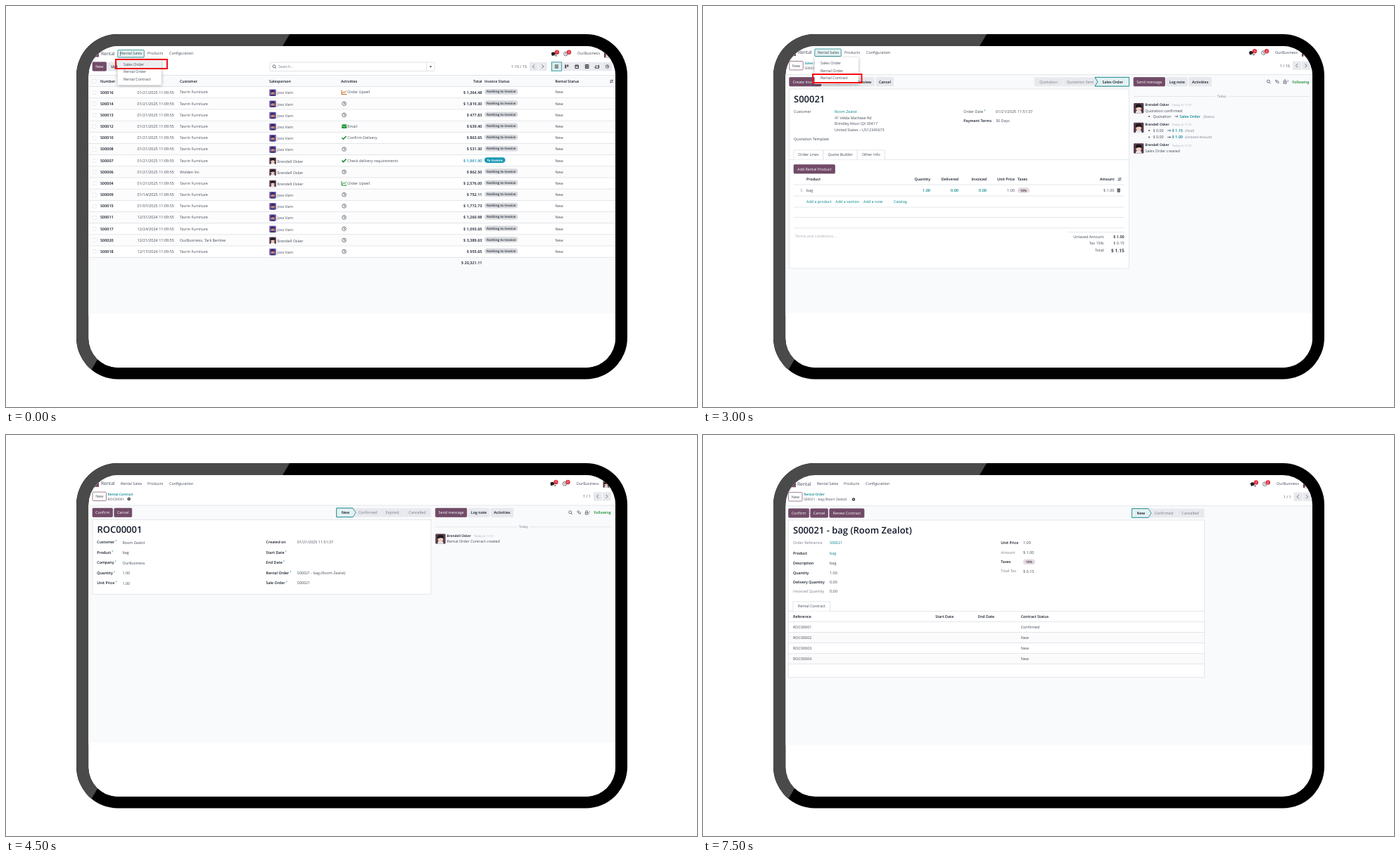
Write an HTML page that moves like this. It is 982 px wide and 570 px high and loops after 8 s.

```html
<!DOCTYPE html>
<html lang="en">
<head>
<meta charset="utf-8">
<title>Rental workflow</title>
<style>
html, body { margin: 0; width: 100%; height: 100%; overflow: hidden; background: #fff; }
svg { display: block; width: 982px; height: 570px; }
text { font: 5.4px "Open Sans", "Noto Sans", sans-serif; fill: #414956; text-rendering: geometricPrecision; white-space: pre; }
.b { font-weight: 600; font-size: 5.3px; fill: #111827; }
.n { font-size: 5.5px; }
.l { font-size: 6.6px; }
.h { font-size: 13px; }
.s { font-size: 4.8px; }
.xs { font-size: 4.2px; }
.pill { font-size: 4.5px; font-weight: 700; }
.w { fill: #fff; }
.teal, .q { fill: #01848a; }
.q { font-size: 4px; font-weight: 600; }
.mute { fill: #777e89; }
.pale { fill: #a9afb8; }
.green { fill: #118a2c; }
.blue { fill: #1687b0; }
.e { text-anchor: end; }
.m { text-anchor: middle; }
.i { font-style: italic; }
.line { fill: none; stroke: #4b5360; stroke-width: .8; }
.shadow { filter: drop-shadow(0 1px 2px #0005); }
.scene { visibility: hidden; animation: show 8s step-end infinite; }
.scene.base { visibility: visible; animation: none; }
@keyframes show { 0% { visibility: visible; } 18.75%, 100% { visibility: hidden; } }
</style>
</head>
<body>
<svg viewBox="0 0 982 570">
  <defs>
    <clipPath id="shell"><rect x="100" y="40" width="783" height="490.500" rx="59"/></clipPath>
    <clipPath id="screen"><rect x="117.500" y="57" width="748.500" height="457" rx="42"/></clipPath>
  </defs>
  <g clip-path="url(#shell)">
    <rect x="100" y="40" width="783" height="491"/>
    <path d="M90 30H409L112 533H90Z" fill="#4a4a4a"/>
  </g>
  <g id="stage" clip-path="url(#screen)"></g>
</svg>
<script>
const PURPLE = '#714b67', GREY = '#e7e9ed', TEAL = '#16878c', EDGE = '#d9dce1', BG = '#f9fafc';
const COMPANY = 'OurBusiness', ADMIN = 'Brendell Osker', SELLER = 'Joss Varn', CLIENT = 'Room Zealot';

const text = (x, y, s, c = '') => `<text x="${x}" y="${y}" dy=".35em" class="${c}">${s}</text>`;
const rect = (x, y, w, h, fill, more = '') => `<rect x="${x}" y="${y}" width="${w}" height="${h}" fill="${fill}" ${more}/>`;
const path = (x, y, d, more = 'class="line"') => `<path transform="translate(${x} ${y})" d="${d}" ${more}/>`;
const fill = c => `fill="${c}"`;
const rule = (x1, x2, y, c = EDGE) => rect(x1, y - .35, x2 - x1, .7, c);
const help = s => `${s}<tspan class="q" dx="1.200" dy="-2">?</tspan>`;
const list = (items, f) => items.map(f).join('');

const button = (x1, x2, y, s, kind = 'main') => {
  const [bg, border, c] = {
    main: [PURPLE, PURPLE, 'm w'], grey: [GREY, GREY, 'm b'], line: ['#fff', PURPLE, 'm']
  }[kind];
  return rect(x1, y - 6.2, x2 - x1, 12.4, bg, `rx="1.200" stroke="${border}" stroke-width=".7"`) +
    text((x1 + x2) / 2, y, s, c);
};
const redBox = (x, y, w, h) => rect(x, y, w, h, 'none', 'stroke="#f01014" stroke-width="2"');
const pill = (x, y, w, s, bg = '#d8dadd', c = '') =>
  rect(x, y - 3.8, w, 7.6, bg, 'rx="3.800"') + text(x + w / 2, y, s, 'pill m ' + c);

const avatar = (x, y, size, admin) => `<g transform="translate(${x} ${y}) scale(${size / 10})">` +
  rect(0, 0, 10, 10, admin ? '#593a4c' : '#6a54a8', 'rx="1"') +
  path(0, 0, 'M2 10Q2 7 5 7T8 10Z', fill(admin ? '#e9e4e4' : '#3c3566')) +
  `<circle cx="5" cy="5" r="2.700" fill="${admin ? '#edcdbd' : '#c98a68'}"/>` +
  path(0, 0, 'M2 5Q1 1 5 1T8 5Q6 3 2 5Z', fill(admin ? '#1d171c' : '#33265e')) + '</g>';

const clock = (x, y, r = 2.8) => `<circle cx="${x}" cy="${y}" r="${r}" class="line"/>` + path(x, y, 'M0-1.700V.3H1.500');
const search = (x, y) => path(x, y, 'M1 1L2.700 2.700M1.500-.5A2 2 0 1 1-2.500-.5A2 2 0 1 1 1.500-.5');
const caret = (x, y) => path(x, y, 'M-1.800-.8H1.800L0 1.200Z', fill('#333'));
const gear = (x, y) => `<circle cx="${x}" cy="${y}" r="1.500" fill="none" stroke="#333" stroke-width="1.400"/>`;
const sliders = (x, y) => path(x, y, 'M-2.500-1.200H2.500M-2.500 1.200H2.500M1-2.500V0M-1 0V2.500');
const badge = (x, y, n) => `<circle cx="${x}" cy="${y}" r="3.200" fill="#dc3545"/>` + text(x, y, n, 'xs m w');

const nav = (y, end, dx = 0) =>
  rect(124, y - 3, 8, 8, PURPLE) + text(135 + dx, y, 'Rental', 'l') +
  list([[163, 'Rental Sales'], [201, 'Products'], [232, 'Configuration']], ([x, s]) => text(x + dx, y, s)) +
  path(end - 66, y + .5, 'M-3 0A3 2.300 0 1 1 1 2L-2 3ZM0 2.500A2.500 2 0 0 0 4 1.500L5 3.500Z', fill('#222')) +
  badge(end - 61, y - 1.8, 7) + clock(end - 48.5, y + .5) + badge(end - 44, y - 1.8, 2) +
  text(end, y, COMPANY, 'e') + avatar(end + 6, y - 3, 9, true);

const menu = (y, hover) =>
  rect(158.8, y - 5, 37.5, 10.5, '#e3f1f2', `rx="1" stroke="${TEAL}" stroke-width=".8"`) + text(163, y, 'Rental Sales') +
  rect(158.5, y + 7, 62.5, 37.8, '#fff', 'class="shadow"') +
  (hover ? rect(158.5, y + 10, 62.5, 10.7, '#eceef0') : '') +
  list(['Sales Order', 'Rental Order', 'Rental Contract'], (s, i) => text(167, y + 15.6 + i * 10.5, s));

const pager = (end, y, s) => text(end, y, s, 'e') +
  rect(end + 4, y - 6.2, 12, 12.4, GREY) + rect(end + 16.8, y - 6.2, 12, 12.4, GREY) +
  path(end + 10, y, 'M1-2.500L-1.500 0L1 2.500') + path(end + 22.5, y, 'M-1-2.500L1.500 0L-1 2.500');

const crumbs = (x, y, parent, s, gearX) => button(x, x + 19.5, y, 'New', 'line') +
  text(x + 21.7, y - 3.2, parent, 'b s teal') + text(x + 21.7, y + 3.6, s, 's') + gear(gearX, y + 3.6);

const status = (y, edges, labels, active) => {
  const step = (s, i) => {
    const a = edges[i], b = edges[i + 1], last = i == labels.length - 1, on = i == active;
    const right = last ? `H${b}V${y + 6.3}` : `H${b - 4}L${b} ${y}L${b - 4} ${y + 6.3}`;
    const left = i ? `H${a - 4}L${a} ${y}Z` : `H${a}Z`;
    return `<path d="M${i ? a - 4 : a} ${y - 6.3}${right}${left}" fill="${on ? '#e3f1f2' : GREY}" stroke="${on ? TEAL : '#f1f2f5'}" stroke-width=".8"/>` +
      text((a + b) / 2 - 1, y, s, on ? 'b m' : 'm mute');
  };
  return list(labels, step) + step(labels[active], active);
};

const message = (x, y, body = '') => avatar(x, y - 2.5, 14.3, true) + text(x + 16.3, y, ADMIN, 'b s') +
  text(x + 54.5, y + .3, 'Today at 11:51', 'xs pale') + text(x + 16.3, y + 8.4, body);
const chatter = (x, y, todayY, followers = 1) =>
  button(x, x + 44.5, y, 'Send message') + button(x + 46.8, x + 76.5, y, 'Log note', 'grey') +
  button(x + 78.8, x + 110.5, y, 'Activities', 'grey') + search(x + 192, y) +
  path(x + 204, y, 'M-2-1L1 2Q3 2 2 0L-1-2.500Q-3-2.500-2-.5L0 1') +
  path(x + 215, y, 'M-2 2.500V0H2V2.500ZM-1.300 0V-1.500A1.300 1.300 0 0 1 1.300-1.500V0') +
  text(x + 218, y - 1, followers, 'xs') + text(x + 249.5, y, 'Following', 'b e green') +
  rule(x, x + 250, todayY) + rect(x + 116, todayY - 3, 18, 6, BG) + text(x + 125, todayY, 'Today', 's m mute');

const sheet = (x1, y1, x2, y2) => rect(x1, y1, x2 - x1, y2 - y1, '#fff', `stroke="${EDGE}" stroke-width=".7"`);
const page = (top, bottom) => rect(117, 57, 750, 458, '#fff') + rect(117, top, 750, bottom - top, BG) + rule(117, 867, top);
const tab = (x1, x2, y, s) => path(0, 0, `M${x1} ${y}V${y - 13.5}H${x2}V${y}`, `fill="#fff" stroke="${EDGE}" stroke-width=".7"`) +
  text((x1 + x2) / 2, y - 6.8, s, 'm');

const ROWS = [
  '16|01/21/2025|F|S|up|1,364.48', '14|01/21/2025|F|S||1,819.30', '13|01/21/2025|F|S||477.83',
  '12|01/21/2025|F|S|mail|639.40', '10|01/21/2025|F|S|confirm|863.65', '08|01/21/2025|F|S||531.30',
  '07|01/21/2025|F|A|check|1,961.90', '06|01/21/2025|W|A||862.50', '04|01/21/2025|F|A|grow|2,576.00',
  '09|01/14/2025|F|S||752.11', '15|01/07/2025|F|S||1,772.73', '11|12/31/2024|F|S||1,260.98',
  '17|12/24/2024|F|S||1,093.65', '20|12/21/2024|J|A||3,389.63', '18|12/17/2024|F|S||955.65'];
const CUSTOMERS = { F: 'Tavrin Furniture', W: 'Wolden Inc', J: COMPANY + ', Tark Benlow' };

const chart = (x, y, c) => path(x, y, 'M-3.500-3V3H4M-2.500 1.500L-.5-.8L.8.4L3.300-2', `fill="none" stroke="${c}"`);
const tick = (x, y) => path(x, y, 'M-3 0L-1 2L3-2.200', 'fill="none" stroke="#118a2c" stroke-width="1.500"');
const ACTIVITIES = {
  '': [clock, ''],
  up: [(x, y) => chart(x, y, '#b8611f'), 'Order Upsell'],
  grow: [(x, y) => chart(x, y, '#118a2c'), 'Order Upsell'],
  mail: [(x, y) => rect(x - 3.3, y - 2.7, 7, 5.4, '#118a2c') + path(x, y, 'M-3.300-1.500L.2 1L3.700-1.500', 'fill="none" stroke="#fff" stroke-width=".7"'), 'Email'],
  confirm: [tick, 'Confirm Delivery'],
  check: [tick, 'Check delivery requirements']
};

const orderRow = (row, i) => {
  const [id, day, customer, who, act, total] = row.split('|'), y = 122.6 + i * 16.17, due = act == 'check';
  const [icon, label] = ACTIVITIES[act];
  return rect(117, y - 8, 750, 16.17, i % 2 ? '#fcfcfd' : '#fff') + rule(117, 867, y - 8) +
    rect(123, y - 2.2, 5, 5, '#fff', `stroke="${EDGE}" stroke-width=".5"`) +
    text(134, y, 'S000' + id, 'b n') + text(186.5, y, day + ' 11:09:55', 'n') + text(247, y, CUSTOMERS[customer]) +
    avatar(374.3, y - 4.2, 9.5, who == 'A') + text(385.3, y + 1, who == 'A' ? ADMIN : SELLER) +
    icon(480.5, y) + text(485.3, y, label) + text(676.5, y, '$ ' + total, 'b n e ' + (due ? 'blue' : '')) +
    (due ? pill(680, y - .5, 29.5, 'To Invoice', '#1797b5', 'w') : pill(680, y - .7, 47.5, 'Nothing to Invoice')) +
    text(780.5, y, 'New');
};

const views = ['M-2.500-2H2.500M-2.500 0H2.500M-2.500 2H2.500', 'M-1.500-2.500V2.500M1.500-2.500V.5', 'M-2.200-2H2.200V2.500H-2.200ZM-2-.7H2',
  'M-2.200-2.500H2.200V2.500H-2.200ZM0-2.500V2.500M-2 0H2', 'M-2.700 2.200V0L-1-1.500L.5 0L2.500-2V2.200Z'];

const orders = () => page(98.5, 437) + nav(67.5, 844) +
  button(123, 142.7, 86, 'New') + button(144.8, 172, 86, 'Upload', 'grey') +
  rect(375, 80, 234, 12.5, '#fff', `stroke="${EDGE}" stroke-width=".8" rx="1"`) + rect(597.3, 80, .7, 12.5, EDGE) +
  search(381.5, 86.3) + text(387, 86.2, 'Search...', 'mute') + caret(603.5, 86.3) + pager(740, 86, '1-15 / 15') +
  list([0, 1, 2, 3, 4, 5], i => rect(775.5 + i * 14.4, 79.8, 13.9, 12.4, i ? GREY : '#d8ebed', i ? '' : `stroke="${TEAL}" stroke-width=".8"`)) +
  list(views, (d, i) => path(782.4 + i * 14.4, 86, d, `fill="none" stroke="#333" stroke-width="${i == 1 ? 1.8 : 1}"`)) + clock(854.5, 86, 2.3) +
  rect(123, 104.3, 5, 5, '#fff', `stroke="${EDGE}" stroke-width=".5"`) +
  list([[134, 'Number'], [186.5, 'Order Date'], [247, 'Customer'], [374, 'Salesperson'], [476, 'Activities'], [680, 'Invoice Status'], [780.5, 'Rental Status']],
    ([x, s]) => text(x, 106.8, s, 'b')) + text(676.5, 106.8, 'Total', 'b e') + sliders(860.5, 107) +
  list(ROWS, orderRow) + rule(117, 867, 357.2) + text(676.5, 365, '$ 20,321.11', 'b n e') +
  menu(67.5, true) + rect(162.5, 64.5, .5, 6.5, '#333') + redBox(156, 76, 73, 13);

const address = (y, c) => text(187, y, CLIENT, c) +
  list(['41 Velda Marlowe Rd', 'Brindley Moor QX 00417', 'United States – US12345673'], (s, i) => text(187, y + 9 + i * 8.5, s));
const links = y => list([[147, 'Add a product'], [188.3, 'Add a section'], [228, 'Add a note'], [271, 'Catalog']], ([x, s]) => text(x, y, s, 'teal'));
const lines = ys => list(ys, y => rule(129, 599, y));

const quotation = () => page(98, 515) + nav(66.7, 845) + crumbs(123, 85.7, 'Sales Orders', 'S00021', 167) + pager(833, 85.5, '1 / 1') +
  button(123, 166.5, 108.3, 'Send by Email') + button(169, 196.5, 108.3, 'Confirm', 'grey') +
  button(199, 227.5, 108.3, 'Preview', 'grey') + button(230.5, 254.5, 108.3, 'Cancel', 'grey') +
  status(108.3, [471.5, 514, 562, 605.5], ['Quotation', 'Quotation Sent', 'Sales Order'], 0) + chatter(612, 108.3, 128.8) +
  message(612, 141, 'Sales Order created') + sheet(123, 119, 605.5, 355.5) + text(129.3, 133, 'S00021', 'b h') +
  text(129.5, 150.3, 'Customer', 'b') + address(150.5) + text(370.3, 150.5, help('Expiration'), 'b') + text(416, 150.5, '02/20/2025', 'n') +
  text(370.3, 165, 'Payment Terms', 'b') + text(416, 165, '30 Days') + text(129.5, 189.3, 'Quotation Template', 'b') +
  rule(123, 605.5, 217.8) + tab(129.5, 171.5, 217.8, 'Order Lines') + tab(171.5, 230, 217.8, 'Optional Products') +
  tab(230, 278, 217.8, 'Quote Builder') + tab(278, 318, 217.8, 'Other Info') +
  button(129.3, 188, 231.5, 'Add Rental Product') + text(147, 245.8, 'Product', 'b') + links(262) + lines([253.8, 270, 285, 299.5, 314.5]) +
  text(131, 326, 'Terms and conditions...', 'pale') + rule(553, 599, 320.3) + text(570.5, 328, 'Total:', 'e') + text(598.5, 328, '$ 0.00', 'b l e') +
  rect(117, 57, 750, 458, '#000', 'opacity=".5"') + redBox(126.8, 220, 70, 20) +
  rect(301, 197, 383, 100, '#fff', 'class="shadow" rx="1"') + text(307.3, 208.4, 'Rental Product', 'b" style="font-size:6.6px') +
  path(675, 208.3, 'M-2.500-2.500L2.500 2.500M2.500-2.500L-2.500 2.500') + rule(301, 684, 219.5) + rule(301, 684, 272) +
  text(307.3, 230.6, help('Product'), 'b') + text(307.3, 245, help('Unit Price')) + text(307.3, 258.7, help('Quantity'), 'b') +
  rule(343, 486.5, 235, TEAL) + rect(343.3, 227, .6, 7, '#222') + path(484.5, 231, 'M-1.500-.7H1.500L0 1Z', fill(TEAL)) +
  text(343.5, 245, '0.00', 'n') + text(343.5, 258.7, '1.00', 'n') + button(307.3, 332.3, 284.3, 'Cancel') + button(334.8, 374.5, 284.3, 'Add Product');

const change = (y, from, to, note) => `<circle cx="634" cy="${y}" r=".9" fill="#333"/>` + text(639.5, y, from) +
  (from == 'Quotation'
    ? path(670.5, y, 'M0 0H4.500M3-1.300L4.500 0L3 1.300') + text(677.3, y, to, 'b teal') + text(711, y, note, 's i mute')
    : path(660, y, 'M0 0H4.500M3-1.300L4.500 0L3 1.300') + text(666.5, y, to, 'b n teal') + text(685, y, note, 's i mute'));

const saleOrder = () => page(97.7, 436) + nav(66, 845) + crumbs(122.7, 84.7, 'Sales Orders', 'S00021', 167) + pager(834, 84.7, '1 / 16') +
  button(122.7, 168, 107.7, 'Create Invoice') + button(170, 213, 107.7, 'Send by Email', 'grey') +
  button(215, 243.5, 107.7, 'Preview', 'grey') + button(246, 270.8, 107.7, 'Cancel', 'grey') +
  status(107.7, [471, 513, 561, 605.5], ['Quotation', 'Quotation Sent', 'Sales Order'], 2) + chatter(612, 107.7, 128.3, 2) +
  message(612, 140.6, 'Quotation confirmed') + change(157, 'Quotation', 'Sales Order', '(Status)') +
  message(612, 168.3) + change(177, '$ 0.00', '$ 1.15', '(Total)') + change(186.5, '$ 0.00', '$ 1.00', '(Untaxed Amount)') +
  message(612, 197.8, 'Sales Order created') + sheet(122.7, 118, 605.5, 373) + text(129, 132.3, 'S00021', 'b h') +
  text(129, 150, 'Customer') + address(150, 'teal') + text(370.3, 150, help('Order Date')) + text(416, 150, '01/21/2025 11:51:37', 'n') +
  text(370.3, 163.2, 'Payment Terms', 'b') + text(416, 163.2, '30 Days') + text(129, 189, 'Quotation Template') +
  rule(122.7, 605.5, 218.3) + tab(129, 171, 218.3, 'Order Lines') + tab(171, 219.3, 218.3, 'Quote Builder') + tab(219.3, 258.5, 218.3, 'Other Info') +
  button(129, 187.5, 231.8, 'Add Rental Product') + text(147, 246, 'Product', 'b') + text(447, 246, 'Taxes', 'b') +
  list([[323, 'Quantity', '1.00'], [363, 'Delivered', '0.00'], [403, 'Invoiced', '0.00'], [443, 'Unit Price', '1.00'], [584.5, 'Amount', '$ 1.00']],
    ([x, s, v], i) => text(x, 246, s, 'b e') + text(x, 262, v, i < 3 ? 'b n e teal' : 'n e')) + sliders(592, 246.2) +
  path(140, 262, 'M-.8-2V2M.8-2V2', 'stroke="#aaa" stroke-dasharray=".8"') + text(147, 262, 'bag') + pill(447, 262, 17, '15%', '#e6d8df') +
  path(590.7, 262, 'M-1.800-1.500H1.800L1.500 2.500H-1.500ZM-2.300-2.200H2.300', `fill="#777" stroke="#444" stroke-width=".7"`) +
  lines([254, 270, 286, 300.5, 315.3]) + links(278) + text(131, 327, 'Terms and conditions...', 'pale') + rule(520, 599, 321.3) +
  list([['Untaxed Amount:', '$ 1.00', 328, 'b n e'], ['Tax 15%:', '$ 0.15', 337.3, 'n e'], ['Total:', '$ 1.15', 347.2, 'b l e']],
    ([s, v, y, c]) => text(570.5, y, s, 'e') + text(598.7, y, v, c)) +
  menu(66) + redBox(156, 97, 69.5, 12);

const contract = dy => {
  const dx = dy ? .6 : 0, left = [['Customer', CLIENT], ['Product', 'bag'], ['Company', COMPANY], ['Quantity', '1.00'], ['Unit Price', '1.00']];
  const right = [['Created on', '01/21/2025 11:51:37'], ['Start Date', ''], ['End Date', ''], ['Rental Order', `S00021 - bag (${CLIENT})`], ['Sale Order', 'S00021']];
  return sheet(123 - dx / 2, 120.6 + dy, 604 + dx * 2, 226.2 + dy) + text(129.5 - dx / 2, 134.6 + dy, 'ROC00001', 'b h') +
    list(left, ([s, v], i) => text(129.3, 152.2 + dy + i * 14.5, help(s), 'b') + text(165.5, 152.7 + dy + i * 14.5, v)) +
    list(right, ([s, v], i) => text(369.6 + dx, 152.2 + dy + i * 14.5, i ? help(s) : s, 'b') + text(413.8 + dx, 152.5 + dy + i * 14.5, v));
};
const STATES = ['New', 'Confirmed', 'Expired', 'Cancelled'];

const newContract = () => page(100, 437.5) + nav(68.8, 842.5) + crumbs(123, 87.3, 'Rental Contract', 'ROC00001', 174.7) + pager(831, 87.3, '1 / 1') +
  button(123, 151.5, 110.3, 'Confirm') + button(153.8, 178.8, 110.3, 'Cancel') + status(110.3, [469.7, 497, 533, 567, 604], STATES, 0) +
  chatter(610.3, 110.3, 130.8) + message(610.3, 143, 'Rental Order Contract created') + contract(0);

const contractMenu = () => page(97.5, 435.5) + nav(65.8, 845) + crumbs(122.7, 84.4, 'Rental Contract', 'ROC00001', 174.7) + pager(833, 84.4, '1 / 1') +
  button(122.7, 151.3, 107.2, 'Confirm') + button(153.6, 178.8, 107.2, 'Cancel') + status(107.2, [470.5, 498, 534, 568, 605.5], STATES, 0) +
  chatter(612, 107.2, 128) + message(612, 140.2, 'Rental Order Contract created') + contract(-2.8) + menu(65.8, true) + redBox(157, 83.7, 69.5, 14);

const rentalOrder = () => page(100.8, 441) + nav(69.2, 847, -1) + crumbs(121.5, 87.8, 'Rental Order', `S00021 - bag (${CLIENT})`, 214) + pager(835.7, 87.8, '1 / 1') +
  button(121.5, 150.7, 111, 'Confirm') + button(152.8, 177.5, 111, 'Cancel') + button(179.8, 229, 111, 'Renew Contract') +
  status(111, [609.5, 637, 674.5, 712.5], ['New', 'Confirmed', 'Cancelled'], 0) + sheet(121.5, 121, 712.5, 344.3) +
  text(128, 135.5, `S00021 - bag (${CLIENT})`, 'b h') +
  list([['Order Reference', 'S00021', 153.4], ['Product', 'bag', 168], ['Description', 'bag', 182.3], ['Quantity', '1.00', 195.7], ['Delivery Quantity', '0.00', 209], ['Invoiced Quantity', '0.00', 222.4]],
    ([s, v, y], i) => text(128, y, s, i % 5 ? 'b' : 'mute') + text(180, y, v, i < 2 ? 'teal' : 'n')) +
  list([['Unit Price', '1.00'], ['Amount', '$ 1.00'], ['Taxes', ''], ['Total Tax', '$ 0.15']],
    ([s, v], i) => text(423.3, 153.4 + i * 13.4, s, i % 2 ? 'mute' : 'b') + text(455, 153.4 + i * 13.4, v, 'n')) + pill(455, 180.2, 17, '15%', '#e6d8df') +
  rule(121.5, 712.5, 250.4) + tab(128, 180.5, 250.4, 'Rental Contract') +
  list([[128, 'Reference'], [330.3, 'Start Date'], [391, 'End Date'], [451.7, 'Contract Status']], ([x, s]) => text(x, 258, s, 'b')) +
  list([1, 2, 3, 4], n => rect(122, 250.6 + n * 14.95, 590, 14.95, n % 2 ? '#fff' : '#fbfbfc') + rule(121.5, 712.5, 250.5 + n * 14.95) +
    text(128, 258 + n * 14.95, 'ROC0000' + n) + text(451.7, 258 + n * 14.95, n == 1 ? 'Confirmed' : 'New')) + rule(121.5, 712.5, 325.2);

// The last screen lies beneath; the others cover it in turn.
const scenes = [orders, quotation, saleOrder, newContract, contractMenu];
document.getElementById('stage').innerHTML = `<g class="scene base">${rentalOrder()}</g>` +
  list(scenes, (draw, i) => `<g class="scene" style="animation-delay:${i * 1.5 - 8}s">${draw()}</g>`);
</script>
</body>
</html>
```
